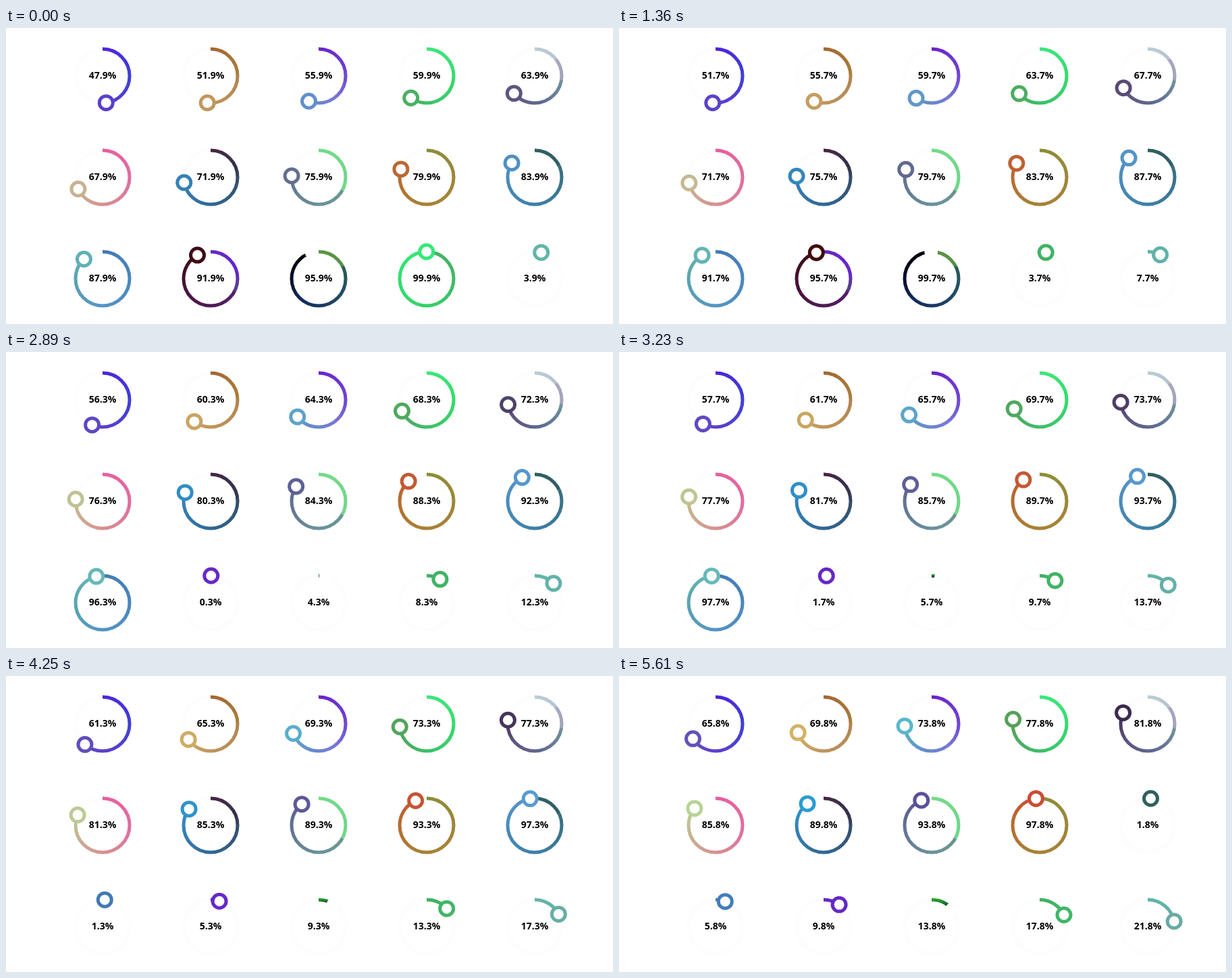
Write an HTML page with a canvas that moves like this. It is 899 px wide and 438 px high and loops after 5780 ms.

```html
<!DOCTYPE html>
<html>
<head>
<meta charset="utf-8">
<style>
html, body { margin: 0; width: 100%; height: 100%; overflow: hidden; background: #fff; }
canvas { display: block; }
</style>
</head>
<body>
<canvas width="899" height="438"></canvas>
<script>
const ctx = document.querySelector('canvas').getContext('2d');
const TAU = Math.PI * 2, RADIUS = 40, STEP = 170, STEPS = 34, BLANK = 12;

// Each dial: percent:colour stops running clockwise from the top
const dials = `
0:4f22dd 25:4040d6 48:5a3fcd 66:6352b8
0:a46631 24:a97f3a 25:b2834f 52:c0975c 70:d4b264
0:6a20cc 25:7048d0 40:7878d5 56:638fca 74:58b8cc
0:3ce87c 25:34dd6c 50:3cc068 60:48b064 78:55a05a
0:bccdd6 14:b4c4d0 15:a8a8bf 27:a0a4b8 28:71929c 45:5f6c92 64:5e5480 82:3c2a4e
0:ea5c9e 28:de70a0 50:d8908f 67:c8b090 86:b8d496
0:4a2545 20:32344e 26:34506a 50:2f6895 72:3580b6 90:2a9cd2
0:72dc88 33:70d68a 33:68968f 50:6a929c 76:62708f 94:5a509a
0:8a8e38 35:a48438 55:a88034 80:ba6832 98:cc4c34
0:30605f 17:305c68 18:3a6e80 50:3c80a8 84:5090c4 99:5a9cd4
0:4279b6 50:5494c4 75:5aa4b0 100:68bcb8
0:6628c4 24:6428c8 26:5a3c94 32:5c3c90 33:522068 65:4c1444 91:3c0c18 98:480808
0:5c983e 17:559048 18:2a5c5a 36:204a66 60:142c60 78:040a22 95:000008
0:3fb263 25:42b868 50:34d268 100:32ea78
0:62b6a6 12:62b2a8 22:6aaaa6`.trim().split('\n').map(line =>
  line.split(' ').map(stop => {
    const [at, hex] = stop.split(':');
    return { at: +at, rgb: hex.match(/../g).map(h => parseInt(h, 16)) };
  }));

// Progress gained since the loop began, as [step, percent]
const pace = [[0, 0], [8, 3.8], [13, 6.3], [17, 8.4], [22, 11.8], [29, 15.6], [33, 17.9]];

function gained(step) {
  const i = Math.max(1, pace.findIndex(p => p[0] >= step));
  const [a, b] = [pace[i - 1], pace[i]];
  return a[1] + (b[1] - a[1]) * (step - a[0]) / (b[0] - a[0]);
}

const css = rgb => `rgb(${rgb.map(Math.round)})`;

function colourAt(stops, value) {
  const i = stops.findIndex(s => s.at >= value);
  if (i < 0) return css(stops[stops.length - 1].rgb);
  if (i === 0) return css(stops[0].rgb);
  const a = stops[i - 1], b = stops[i];
  const k = (value - a.at) / (b.at - a.at);
  return css(a.rgb.map((c, n) => c + (b.rgb[n] - c) * k));
}

function sweep(stops, x, y) {
  const paint = ctx.createConicGradient(-TAU / 4, x, y);
  stops.forEach(s => paint.addColorStop(s.at / 100, css(s.rgb)));
  return paint;
}

function fade(y, endY) {
  const paint = ctx.createLinearGradient(0, y - 42, 0, endY);
  paint.addColorStop(0, '#2db52d');
  paint.addColorStop(1, '#0a1a3a');
  return paint;
}

function ring(x, y, r, paint, turn = 1) {
  ctx.beginPath();
  ctx.arc(x, y, r, -TAU / 4, TAU * (turn - 0.25));
  ctx.strokeStyle = paint;
  ctx.stroke();
}

function drawDial(stops, i, gain) {
  const x = 143 + i % 5 * 160, y = 71 + Math.floor(i / 5) * 150;
  const value = Math.round((47.9 + 4 * i + gain) * 10) % 1000 / 10;
  const angle = value / 100 * TAU;
  const hx = x + RADIUS * Math.sin(angle), hy = y - RADIUS * Math.cos(angle);
  const restarted = i === BLANK && value < 50;

  ring(x, y, RADIUS, '#fdfdfd');
  ring(x, y, RADIUS, restarted ? fade(y, hy) : sweep(stops, x, y), value / 100);

  ctx.beginPath();
  ctx.arc(hx, hy, 10, 0, TAU);
  ctx.fillStyle = '#fff';
  ctx.fill();
  if (i !== BLANK) ring(hx, hy, 10, colourAt(stops, value));

  ctx.fillStyle = '#000';
  ctx.fillText(value.toFixed(1) + '%', x, y + 4);
}

function draw(now) {
  const gain = gained(Math.floor(now / STEP) % STEPS);
  ctx.fillStyle = '#fff';
  ctx.fillRect(0, 0, 899, 438);
  ctx.lineWidth = 5;
  ctx.font = 'bold 14px "Open Sans", "Noto Sans", sans-serif';
  ctx.textAlign = 'center';
  dials.forEach((stops, i) => drawDial(stops, i, gain));
}

const start = performance.now();
function tick() {
  draw(performance.now() - start);
  requestAnimationFrame(tick);
}
tick();
</script>
</body>
</html>
```
